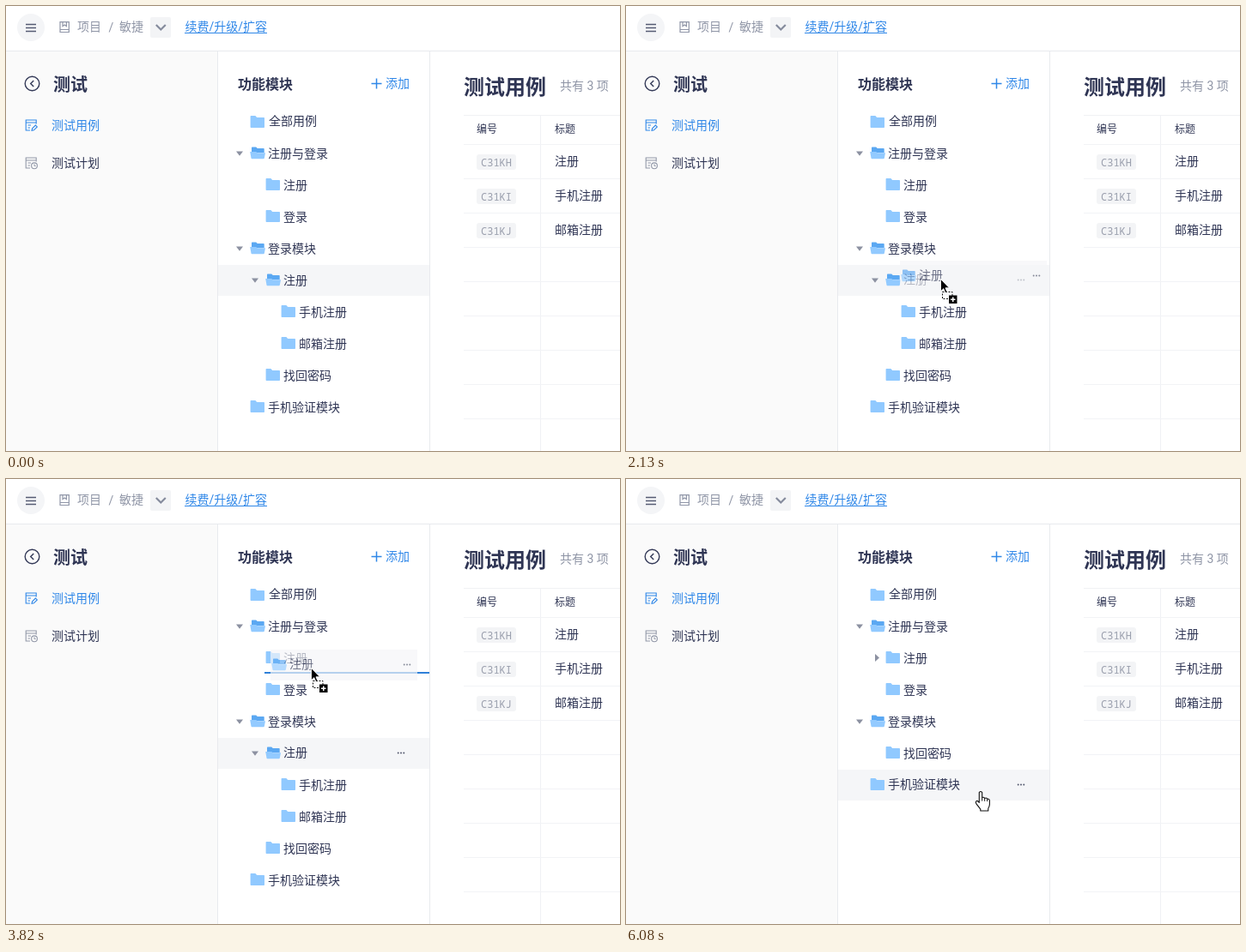
Recreate the animation shown at these times as an HTML page. Size 715 px wide and 519 px high, loop 6150 ms.

```html
<!DOCTYPE html>
<html lang="zh-CN">
<head>
<meta charset="utf-8">
<title>功能模块</title>
<style>
  html, body { margin: 0; width: 100%; height: 100%; overflow: hidden; background: #fff; }
  svg { display: block; }
  text { font-family: Roboto, "Noto Sans CJK SC", "Noto Sans CJK", sans-serif; white-space: pre; }
  .mono { font-family: "Noto Sans Mono", "Liberation Mono", monospace; }
</style>
</head>
<body>
<svg id="stage" width="715" height="519" viewBox="0 0 715 519">
  <g id="page"></g>
  <g id="tree"></g>
  <g id="over"></g>
</svg>
<script>
const LOOP = 6150;
const INK = '#2f3554', BLUE = '#2f87e8', MUTED = '#8f95a6', PALE = '#f5f6f8', RULE = '#e8eaee';
const $ = id => document.getElementById(id);

// Text is placed by the vertical centre of its glyphs.
const text = (s, x, mid, size = 14, fill = INK, extra = '') =>
  `<text x="${x}" y="${mid + size * 0.38}" font-size="${size}" fill="${fill}" ${extra}>${s}</text>`;
const rect = (x, y, w, h, fill, extra = '') =>
  `<rect x="${x}" y="${y}" width="${w}" height="${h}" fill="${fill}" ${extra}/>`;
const path = (d, stroke, width = 1, fill = 'none', extra = '') =>
  `<path d="${d}" stroke="${stroke}" stroke-width="${width}" fill="${fill}" ${extra}/>`;
const at = (x, y, body) => `<g transform="translate(${x} ${y})">${body}</g>`;
const bold = 'font-weight="700"';

function header() {
  return rect(0, 52, 715, 1, RULE) +
    '<circle cx="29" cy="25" r="16" fill="#f4f5f7"/>' +
    path('M23 21.5H35M23 25.5H35M23 29.5H35', '#555b73', 1.3) +
    path('M63 18.7H73.3V30.5H63ZM63 27.5H73.3M66 19V23.5L68.2 22L70.4 23.5V19', '#9096a8', 1.2) +
    text('项目', 83, 24, 14, MUTED) + text('/', 119.5, 24.5, 14, MUTED) + text('敏捷', 132, 24, 14, MUTED) +
    rect(168, 13, 24, 24, '#f3f4f6', 'rx="2"') +
    path('M174.8 22L180.3 27.5L185.8 22', '#858b9d', 2.2) +
    text('续费/升级/扩容', 208.5, 24, 14, BLUE) + rect(208, 31, 96, 1, BLUE);
}

function menuIcon(y, color, badge) {
  return at(22, y, path('M6 13H1.2V1H13.2V5.5M1.2 4H13.2M3.5 7H7M3.5 10H6', color, 1.1) + badge);
}

function sidebar() {
  const pen = path('M8 13.3L8.6 10.9L12.4 7L14.3 8.9L10.4 12.8Z', BLUE, 1.1);
  const clock = '<circle cx="11" cy="10.3" r="3.4" fill="none" stroke="#9298a8" stroke-width="1.1"/>' +
    path('M11 8.4V10.5H12.6', '#9298a8');
  return rect(0, 53, 246, 466, '#fafafa') +
    '<circle cx="30.5" cy="90.5" r="8.3" fill="none" stroke="#343a58" stroke-width="1.4"/>' +
    path('M32.2 87L28.7 90.5L32.2 94', '#343a58', 1.4) +
    text('测试', 55, 91, 20, INK, bold) +
    menuIcon(132, BLUE, pen) + text('测试用例', 53, 139, 14, BLUE) +
    menuIcon(176, '#9298a8', clock) + text('测试计划', 53, 183);
}

function table() {
  let s = text('测试用例', 533, 94, 24, INK, bold) + text('共有 3 项', 645, 93, 14, MUTED) +
    rect(533, 127, 182, 1, '#f0f1f4') + rect(622, 127, 1, 392, '#f0f1f4') +
    text('编号', 548, 143.5, 12) + text('标题', 639, 143.5, 12);
  for (let y = 161; y < 519; y += 40) s += rect(533, y, 182, 1, '#f2f3f6');
  [['C31KH', '注册'], ['C31KI', '手机注册'], ['C31KJ', '邮箱注册']].forEach(([id, name], i) => {
    const y = 181 + 40 * i;
    s += rect(548, y - 8, 46, 18, '#f3f4f6', 'rx="3"') +
      text(id, 553, y + 1.7, 12, '#9a9fad', 'class="mono"') + text(name, 639, y);
  });
  return s;
}

$('page').innerHTML = header() + sidebar() + table() +
  rect(493, 53, 1, 466, RULE) +
  '<rect id="divider" x="246" y="53" width="1" height="466"/>' +
  text('功能模块', 270, 91, 16, INK, bold) +
  path('M425.5 90.5H437.5M431.5 84.5V96.5', BLUE, 1.5) + text('添加', 442, 90, 14, BLUE);

// Tree rows: name, depth, kind ("open", "shut" with a caret, or a plain leaf).
const HEAD = [['注册与登录', 0, 'open']];
const BEFORE = [...HEAD, ['注册', 1], ['登录', 1], ['登录模块', 0, 'open'], ['注册', 1, 'open'],
  ['手机注册', 2], ['邮箱注册', 2], ['找回密码', 1], ['手机验证模块', 0]];
const AFTER = [...HEAD, ['注册', 1, 'shut'], ['登录', 1], ['登录模块', 0, 'open'],
  ['找回密码', 1], ['手机验证模块', 0]];
const PICKED = 4;
const rowMid = i => 172 + 37 * i;
const rowAt = y => Math.floor((y - 153.5) / 37);

const folder = (x, y, open) => at(x, y, open
  ? path('M2 7V1Q2 .4 2.7 .4H7.2L8.8 2H16Q16.7 2 16.7 2.7V7Z', 'none', 0, '#5ba8f2') +
    path('M.2 6H7.2L8.6 7.2H18L16.8 13.4Q16.6 14.2 15.8 14.2H2.4Q1.6 14.2 1.5 13.4Z', 'none', 0, '#92caff')
  : path('M.6 .8Q.6 0 1.4 0H6.4L8.2 2H16.2Q17 2 17 2.8V13.2Q17 14 16.2 14H1.4Q.6 14 .6 13.2Z', 'none', 0, '#90c9ff'));
const dots = y => [456.7, 460, 463.3].map(x => `<circle cx="${x}" cy="${y}" r="1" fill="#555a6e"/>`).join('');

function label([name, depth, kind], mid, lift) {
  const x = 284 + 18 * depth;
  return folder(x, mid - 8, kind === 'open') + text(name, x + 21, mid - lift);
}

function drawTree(rows, hover, picked) {
  let s = folder(284, 128) + text('全部用例', 306, 134);
  rows.forEach((row, i) => {
    const mid = rowMid(i), x = 272 + 18 * row[1], on = i === hover;
    if (on || i === picked) s += rect(247, mid - 18, 246, 36, PALE);
    if (row[2] === 'open') s += path(`M${x - 4} ${mid - 2.5}H${x + 4}L${x} ${mid + 2.7}Z`, 'none', 0, '#8c91a1');
    if (row[2] === 'shut') s += path(`M${x} ${mid - 5}V${mid + 4}L${x + 5} ${mid - .5}Z`, 'none', 0, '#8c91a1');
    s += label(row, mid, on ? 1 : 0) + (on ? dots(mid - .5) : '');
  });
  return s;
}

const ARROW = 'M.5 .5V16L4.1 12.7L6.5 18.2L8.9 17.2L6.5 11.8H11.4Z';
const HAND = 'M-1.7 1.6Q0 -.7 1.7 1.6V7.6Q3.7 6.6 4.7 8.4Q6.7 7.4 7.7 9.2Q10 8.6 10.4 11V15.6' +
  'Q10.3 18 8.8 20.2V23H-.2V21.2L-5.2 14.6Q-6.3 12 -4.5 11.4Q-3.3 11.2 -1.7 13.4Z';
const arrow = path(ARROW, '#111', 1, '#fff');
const hand = path(HAND, '#111', 1.1, '#fff', 'stroke-linejoin="round"') +
  path('M1.7 7.6V11.5M4.7 8.4V11.8M7.7 9.2V12', '#111', 1);
const dragArrow = path(ARROW, '#fff', 1, '#000', 'transform="scale(.92)"') +
  path('M2.5 15.5H14V23.5H2.5Z', '#111', 1, 'none', 'stroke-dasharray="2 1.5"') +
  rect(10, 19.5, 9.5, 9.5, '#000') + path('M12 24.25H17.5M14.75 21.5V27', '#fff', 1.5);

const ghost = '<g opacity=".68">' + rect(301, 302, 171, 36, PALE) +
  label(BEFORE[PICKED], 320, 1) + dots(319.5) + '</g>';
const tip = rect(355.5, 335.5, 39, 23, '#fff', 'stroke="#8a8a8a"') + text('注册', 363, 347, 12, '#575757');

// Pointer path: time, x, y.
const WAY = [[350, 190, 412], [430, 205, 382], [510, 226, 362], [590, 249, 350], [664, 269, 343],
  [745, 291, 335], [900, 321, 324], [970, 332, 322], [1040, 346, 321], [1919, 346, 321],
  [1920, 361, 320], [2145, 366, 318], [2370, 380, 306], [2520, 389, 298], [2590, 392, 293],
  [2667, 393, 288], [2900, 393, 272], [3130, 389, 256], [3500, 372, 238], [3820, 355, 220],
  [3900, 350, 217], [4130, 341, 212], [5700, 341, 212], [5770, 346, 220], [5925, 376, 290], [6080, 413, 364]];
// Bursts of movement: first step, last step, number of steps.
const BURSTS = [[350, 900, 8], [970, 1040, 2], [1920, 2520, 9], [2590, 3130, 8],
  [3210, 3820, 9], [3900, 4130, 4], [5770, 6080, 5]];

function snap(t) {
  const [from, to, n] = BURSTS.filter(b => b[0] <= t).pop();
  const gap = (to - from) / (n - 1);
  return from + gap * Math.min(n - 1, Math.floor((t - from) / gap + 0.22));
}

function pointer(t) {
  const i = WAY.findIndex(w => w[0] >= t - 1e-6);
  if (i < 1) return WAY[i < 0 ? WAY.length - 1 : 0].slice(1);
  const [a, b] = [WAY[i - 1], WAY[i]], k = (t - a[0]) / (b[0] - a[0]);
  return [1, 2].map(j => Math.round(a[j] + (b[j] - a[j]) * k));
}

// Insertion line near the top or bottom quarter of the row under the pointer.
function dropLine(y) {
  const i = rowAt(y), part = (y - rowMid(i) + 18) / 36;
  if (i === PICKED || (part > 0.25 && part < 0.75)) return '';
  const x = 283 + 18 * BEFORE[i][1];
  return rect(x, rowMid(i) + (part < 0.5 ? -18 : 16), 493 - x, 2, '#2f80d8');
}

function draw(t) {
  const shown = t >= 350, drag = t >= 1920 && t < 4530;
  const rows = t < 5140 ? BEFORE : AFTER;
  let hover = -1, over = '';
  if (shown) {
    const [x, y] = pointer(snap(t));
    if (drag) {
      hover = PICKED;
      over = (t >= 2590 ? dropLine(y) : '') + at(x - 348, y - 323, ghost) + at(x, y, dragArrow);
    } else {
      if (x > 247) hover = rowAt(y);
      over = at(x, y, x >= 301 ? hand : arrow);
      if (t >= 1520 && t < 1920) over += tip;
    }
  }
  $('divider').setAttribute('fill', t >= 570 && t < 820 ? '#c6ccd8' : RULE);
  $('tree').innerHTML = drawTree(rows, hover, t < 5140 ? PICKED : -1);
  $('over').innerHTML = over;
}

const start = performance.now();
function frame() {
  draw((performance.now() - start) % LOOP);
  requestAnimationFrame(frame);
}
frame();
</script>
</body>
</html>
```
